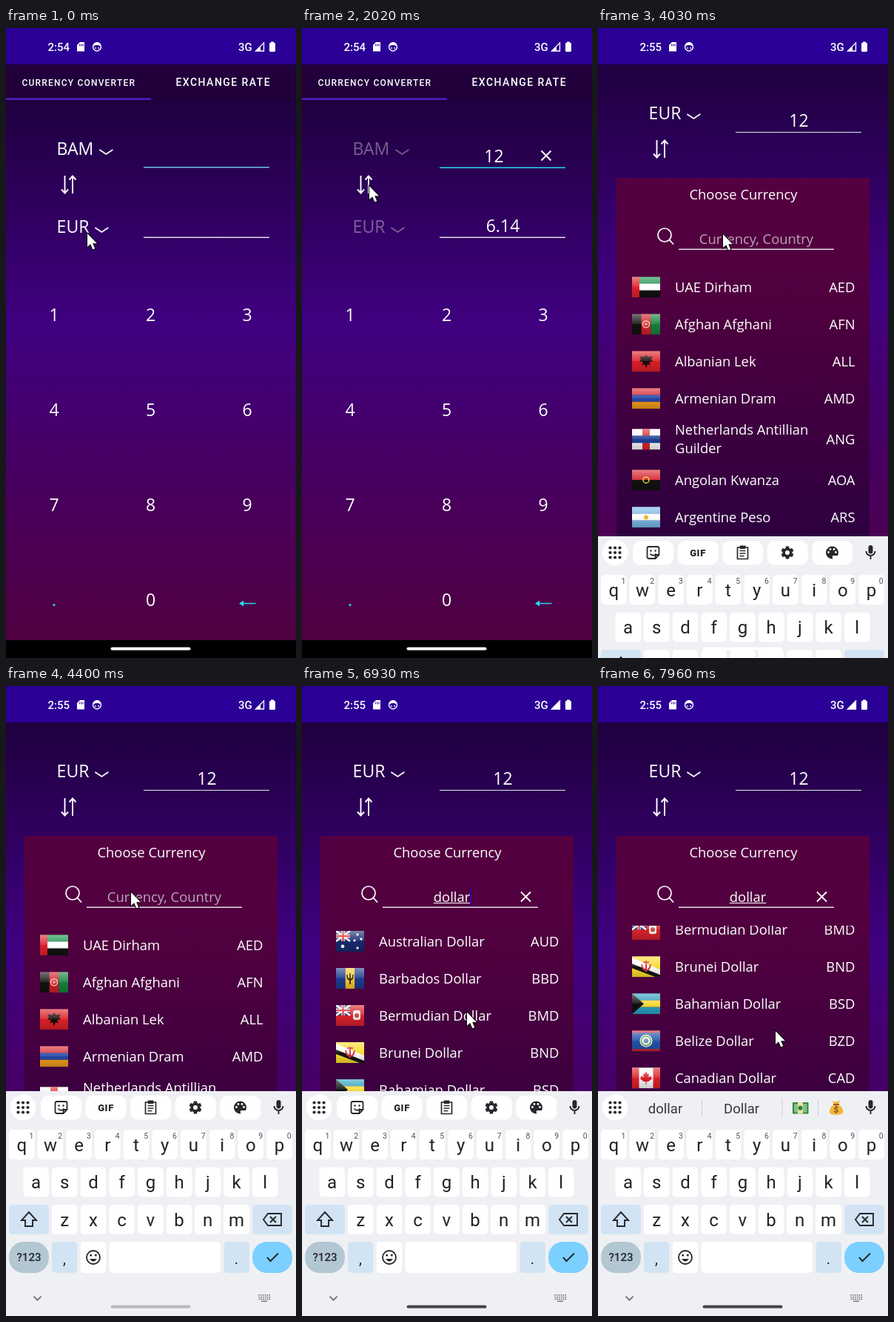
Animation of 392x849 px, one loop 7990 ms. Source, as an HTML page with a canvas:

```html
<!DOCTYPE html>
<html lang="en">
<head>
<meta charset="utf-8">
<title>Currency converter</title>
<style>
html, body { margin: 0; width: 100%; height: 100%; overflow: hidden; background: #000; }
canvas { display: block; }
</style>
</head>
<body>
<canvas id="stage" width="392" height="849"></canvas>
<script>
const c = document.getElementById('stage').getContext('2d');
const LOOP = 7990, SANS = '"Open Sans", "Noto Sans", sans-serif', UI = 'Roboto, sans-serif';
const CYAN = '#22d8ee', CARET = '#2e00a0', INK = '#26282c';

// ---------- helpers ----------
const clamp = v => Math.max(0, Math.min(1, v));
const prog = (t, a, b) => clamp((t - a) / (b - a));
const mix = (a, b, p) => a + (b - a) * p;
const smooth = p => p * p * (3 - 2 * p);
const out = (p, n) => 1 - (1 - p) ** n;

function rect(x, y, w, h, fill, r = 0) {
  c.fillStyle = fill;
  c.beginPath();
  c.roundRect(x, y, w, h, r);
  c.fill();
}
function dot(x, y, r, fill) {
  c.fillStyle = fill;
  c.beginPath();
  c.arc(x, y, r, 0, 7);
  c.fill();
}
function ring(x, y, r, color, w) {
  c.strokeStyle = color;
  c.lineWidth = w;
  c.beginPath();
  c.arc(x, y, r, 0, 7);
  c.stroke();
}
// SVG path at x, y; filled when w is 0, otherwise stroked
function path(d, x, y, color, w = 0) {
  const p = new Path2D(d);
  c.save();
  c.translate(x, y);
  c.fillStyle = c.strokeStyle = color;
  c.lineWidth = w;
  w ? c.stroke(p) : c.fill(p);
  c.restore();
}
// y is the middle of the capitals
function text(s, x, y, size, { color = '#fff', align = 'left', font = SANS, weight = 400, gap = 0 } = {}) {
  c.font = `${weight} ${size}px ${font}`;
  c.letterSpacing = gap + 'px';
  c.textAlign = align;
  c.fillStyle = color;
  c.fillText(s, x, y + size * 0.357);
  const w = c.measureText(s).width;
  c.letterSpacing = '0px';
  return w;
}
function gradient(y, h, stops) {
  const g = c.createLinearGradient(0, y, 0, y + h);
  stops.forEach(([p, color]) => g.addColorStop(p, color));
  return g;
}
const cross = (x, y) => path('M-6.5-6.5L6.5 6.5M6.5-6.5L-6.5 6.5', x, y, '#fff', 1.9);
const caret = (x, y, h) => rect(Math.floor(x), y, 2, h, CARET);

// ---------- flags, 38 x 28 ----------
const W = 38, H = 28;
const rows = (...cs) => cs.forEach((k, i) => rect(0, i * H / cs.length, W, H / cs.length, k));
const cols = (...cs) => cs.forEach((k, i) => rect(i * W / cs.length, 0, W / cs.length, H, k));
function ensign(base) {
  rect(0, 0, W, H, base);
  rect(0, 0, 19, 14, '#1d2f73');
  path('M0 0L19 14M19 0L0 14', 0, 0, '#fff', 2.4);
  path('M9.5 0V14M0 7H19', 0, 0, '#fff', 4.4);
  path('M9.5 0V14M0 7H19', 0, 0, '#d22', 2.4);
}
const FLAGS = {
  AED() { rows('#149148', '#fff', '#111'); rect(0, 0, 10, H, '#e0202a'); },
  AFN() { cols('#111', '#d01f26', '#17803c'); ring(19, 14, 4.5, '#f0c0b0', 1.6); dot(19, 14, 2, '#e8a090'); },
  ALL() { rect(0, 0, W, H, '#dc1f26'); path('M19 5l3 3 6-1-2 4 2 3-5 1 2 4-4-1-2 5-2-5-4 1 2-4-5-1 2-3-2-4 6 1z', 0, 0, '#1a0a0a'); },
  AMD() { rows('#d6232c', '#2145a5', '#ee9a1c'); },
  ANG() { rect(0, 0, W, H, '#f6f6f6'); rect(14, 0, 10, H, '#d8232a'); rect(0, 9, W, 10, '#1c3f96'); },
  AOA() { rows('#d6202a', '#111'); ring(19, 14, 4, '#f4cc2c', 1.6); },
  ARS() { rows('#78b6e6', '#fff', '#78b6e6'); dot(19, 14, 3, '#f0b430'); },
  AUD() {
    ensign('#17296e');
    [[9, 21, 2.4], [29, 5, 1.6], [25, 13, 1.6], [34, 11, 1.6], [29, 23, 1.8]].forEach(s => dot(...s, '#fff'));
  },
  AWG() { rect(0, 0, W, H, '#4a90dc'); rect(0, 17, W, 2, '#f6dc30'); rect(0, 21, W, 2, '#f6dc30'); dot(8, 8, 3, '#d8232a'); },
  AZN() { rows('#2396c8', '#d8232a', '#2a9a4c'); dot(19, 14, 3, '#fff'); },
  BAM() { rect(0, 0, W, H, '#1c3596'); path('M11 0H33V28z', 0, 0, '#f6cf2a'); },
  BBD() { cols('#1c3c8e', '#f8c92c', '#1c3c8e'); path('M19 7V22M15 9q0 7 4 7q4 0 4-7', 0, 0, '#1a1a1a', 1.7); },
  BMD() { ensign('#d6222c'); rect(23, 7, 10, 13, '#f4ece4', 3); dot(28, 14, 3, '#c8444a'); },
  BND() {
    rect(0, 0, W, H, '#f8dc2c');
    path('M0 2L38 18V26L0 10z', 0, 0, '#fff');
    path('M0 10L38 25V28H32L0 16z', 0, 0, '#151515');
    path('M19 6V21M13 11q1 8 6 8q5 0 6-8M15 8H23', 0, 0, '#d6303a', 2);
  },
  BSD() { rows('#2a9fc0', '#f8dc3c', '#2a9fc0'); path('M0 0L16 14L0 28z', 0, 0, '#111'); },
  BZD() {
    rect(0, 0, W, H, '#2254a8');
    rect(0, 0, W, 3, '#d6222c');
    rect(0, 25, W, 3, '#d6222c');
    dot(19, 14, 8.5, '#f2f2ea');
    ring(19, 14, 6.5, '#58a058', 1.4);
    rect(16, 11, 6, 6, '#6f9cc0', 2);
  },
  CAD() {
    rect(0, 0, W, H, '#f8f8f8');
    rect(0, 0, 9.5, H, '#dc2028');
    rect(28.5, 0, 9.5, H, '#dc2028');
    path('M19 5l2 4 2-1-.6 5 3-2 1.6 4-5 4H16l-5-4 1.6-4 3 2-.6-5 2 1zM18.5 18h1v5h-1z', 0, 0, '#dc2028');
  }
};
function flag(code, x, y) {
  c.save();
  c.translate(x, y);
  c.beginPath();
  c.rect(0, 0, W, H);
  c.clip();
  FLAGS[code]();
  rect(0, 0, W, H, gradient(0, H, [[0, '#ffffff70'], [.48, '#ffffff18'], [.5, '#00000000'], [1, '#00000030']]));
  c.restore();
}

const CURRENCIES = [
  ['AED', 'UAE Dirham'], ['AFN', 'Afghan Afghani'], ['ALL', 'Albanian Lek'], ['AMD', 'Armenian Dram'],
  ['ANG', 'Netherlands Antillian', 'Guilder'], ['AOA', 'Angolan Kwanza'], ['ARS', 'Argentine Peso'],
  ['AUD', 'Australian Dollar'], ['AWG', 'Aruban Florin'], ['AZN', 'Azerbaijani Manat'],
  ['BAM', 'Bosnia and', 'Herzegovina Mark'], ['BBD', 'Barbados Dollar'], ['BMD', 'Bermudian Dollar'],
  ['BND', 'Brunei Dollar'], ['BSD', 'Bahamian Dollar'], ['BZD', 'Belize Dollar'], ['CAD', 'Canadian Dollar']
];

// ---------- timeline ----------
const PRESS = { one: 600, two: 1170, open: 3406, search: 3950 };
const TYPED = [4800, 5050, 5540, 5960, 6200, 6455];
// time and place of the pointer tip
const POINTER = [
  [290, 110, 277], [560, 60, 388], [680, 60, 388], [1060, 168, 386], [1400, 168, 386], [1720, 91, 213],
  [2570, 91, 213], [2900, 122, 169], [3560, 122, 169], [3900, 169, 278], [5950, 169, 278], [6700, 222, 478],
  [6750, 222, 478], [6930, 223, 440], [7150, 229, 385], [7250, 230, 383], [7800, 240, 465]
];
function pointerAt(t) {
  const i = POINTER.findIndex(k => k[0] > t);
  if (i < 0) return POINTER.at(-1).slice(1);
  if (!i) return POINTER[0].slice(1);
  const [a, b] = [POINTER[i - 1], POINTER[i]], p = prog(t, a[0], b[0]);
  const e = t > 6750 && t < 7150 ? p : smooth(p);
  return [mix(a[1], b[1], e), mix(a[2], b[2], e)];
}
function scrollAt(t) {
  if (t < 6930) return 5 * prog(t, 6890, 6930);
  return t < 7150 ? mix(5, 60, prog(t, 6930, 7150)) : mix(60, 121, out(prog(t, 7150, 7990), 3));
}

// ---------- screen parts ----------
function statusBar(t) {
  rect(0, 0, 392, 49, '#2b0096');
  const opt = { font: UI, weight: 500 };
  text(t < 2700 ? '2:54' : '2:55', 56.5, 25.5, 15, opt);
  path('M100 19H106V31.5H96V23z', 0, 0, '#fff');
  path('M99.7 21.5v3M102 21.5v3M104.2 21.5v3', 0, 0, '#2b0096', 1);
  ring(123, 25.5, 5.4, '#fff', 1.5);
  path('M117.5 24.5a5.5 5.5 0 0 1 11 0q-5.5-3-11 0z', 0, 0, '#fff');
  dot(121, 27, .9, '#fff');
  dot(125, 27, .9, '#fff');
  text('3G', 314, 25.5, 15, opt);
  path('M348.5 20V31H337.5z', 0, 0, '#fff', 1.3);
  path(t < 4600 ? 'M344 25V31H337.5z' : 'M349 19V31.5H336.5z', 0, 0, '#fff');
  rect(358, 18.5, 4, 3, '#fff');
  rect(356, 20, 8, 12, '#fff', 1.2);
}

function tabs() {
  rect(0, 49, 392, 48, '#21003b');
  const opt = { font: UI, weight: 500 };
  text('CURRENCY CONVERTER', 21.5, 73.5, 12, { ...opt, gap: 1.2 });
  text('EXCHANGE RATE', 229.5, 73.5, 14, { ...opt, gap: 1.45 });
  rect(0, 94.5, 196, 2.5, '#4c1fc2');
}

function currency(name, y) {
  const w = text(name, 68.6, y, 23);
  path('M-9-3L0 3L9-3', 68.6 + w + 17, y + 4, '#fff', 1.8);
}

function ripple(t, start, x, y, cx, cy) {
  const p = prog(t, start, start + 250);
  if (t < start || t > start + 400) return;
  const px = mix(x, cx, p), py = mix(y, cy, p), r = mix(42, 56, p);
  c.globalAlpha = prog(t, start, start + 60) * (1 - prog(t, start + 200, start + 400));
  const g = c.createRadialGradient(px, py, 0, px, py, r);
  [[0, '#ffffff44'], [.5, '#ffffff3a'], [.8, '#ffffff22'], [1, '#ffffff00']].forEach(s => g.addColorStop(...s));
  dot(px, py, r, g);
  c.globalAlpha = 1;
}

function converter(t) {
  const swapped = t >= 2100, focus = t < PRESS.search;
  const amount = t < 620 ? '' : t < 1190 ? '1' : '12';
  const result = swapped ? '23.47' : ['', '0.51', '6.14'][amount.length];
  c.globalAlpha = swapped ? prog(t, 2110, 2310) : 1 - prog(t, 1940, 2070);
  currency(swapped ? 'EUR' : 'BAM', 163);
  currency(swapped ? 'BAM' : 'EUR', 268);
  c.globalAlpha = 1;
  path('M79.5 199V222M75 217.5L79.5 222.5L84 217.5M90 223V200M85.5 204.5L90 199.5L94.5 204.5', 0, 0, '#fff', 1.9);

  const x = amount && focus ? 259.5 : 271.5;
  const w = text(amount, x, 172.5, 23, { align: 'center' });
  if (focus && (t >= 110 && t < 1690 || t >= 2620)) caret(x + w / 2, 157, 29);
  if (focus && amount) cross(330, 172);
  if (focus) rect(186, amount ? 187.5 : 187, 170, 1.5, amount ? CYAN : '#6cc4ea');
  else rect(186, 188, 170, 1, '#e8e2ee');
  text(result, 271.5, 266.5, 23, { align: 'center' });
  rect(186, 281.5, 170, 1.5, '#e0dce6');
}

function keypad() {
  for (let i = 0; i < 9; i++) text(i + 1, 65 + i % 3 * 130.6, 387 + (i / 3 | 0) * 128, 23, { align: 'center' });
  text('0', 195.6, 771, 23, { align: 'center' });
  dot(65, 777.5, 1.6, CYAN);
  path('M318 775.5H337.5', 0, 0, CYAN, 1.5);
  path('M315 775.5L321 771.5V779.5z', 0, 0, CYAN);
}

function dialog(t) {
  if (t < PRESS.open) return;
  const top = mix(825, 202, out(prog(t, PRESS.open, 3618), 2)), h = 623;
  const flags = t >= 3650;
  const query = 'dollar'.slice(0, TYPED.filter(k => k <= t).length);
  rect(25, top, 342, h, gradient(top, h, [[0, '#550040'], [.25, '#50003f'], [1, '#1f0040']]));
  text('Choose Currency', 196.5, top + 22.5, 18.4, { align: 'center' });
  ring(90, top + 77, 9, '#fff', 1.7);
  path('M96.5 83.5L102 89.5', 0, top, '#fff', 1.8);
  rect(109, top + 95.5, 210, 1.4, '#e4dce4');

  if (query) {
    const w = text(query, 202.5, top + 82.5, 18.4, { align: 'center' });
    rect(202.5 - w / 2, top + 90, w, 1.1, '#fff');
    const last = TYPED[query.length - 1];
    if (Math.floor((t - last) / 500) % 2 == 0) caret(202.5 + w / 2, top + 69, 25);
    cross(302.5, top + 82);
  } else {
    text('Currency, Country', 214, top + 82, 18.4, { align: 'center', color: '#bba6b8' });
  }

  c.save();
  c.beginPath();
  c.rect(25, top + 121, 342, h - 121);
  c.clip();
  let y = top + 122.2 - scrollAt(t);
  for (const [code, ...lines] of CURRENCIES) {
    if (!lines.join(' ').toLowerCase().includes(query)) continue;
    const rowH = Math.max(flags ? 50 : 35.2, lines.length > 1 ? 60 : 0), mid = y + rowH / 2;
    lines.forEach((s, i) => text(s, 104, mid + (i - (lines.length - 1) / 2) * 25, 18.4));
    text(code, 347.5, mid, 18.4, { align: 'right' });
    if (flags) flag(code, 46, mid - 14);
    y += rowH;
  }
  c.restore();
}

function toolbar() {
  for (let i = 0; i < 5; i++) rect(47 + i * 60.6, 552, 55, 32.5, '#fff', 10);
  path('M-8-5.5q0-2.5 2.5-2.5H5.5q2.5 0 2.5 2.5V3L3 8H-5.5q-2.5 0-2.5-2.5zM8 3H5q-2 0-2 2V8M-4 1.5q4 4.5 8 0', 74.5, 568, INK, 1.8);
  dot(71.5, 565.5, 1.2, INK);
  dot(77.5, 565.5, 1.2, INK);
  text('GIF', 135, 568, 13, { font: UI, weight: 900, align: 'center', color: INK, gap: .6 });
  path('M-7-7H7V8.5H-7zM-4-2.5H4M-4 1H4M-4 4.5H2', 195.5, 568, INK, 1.7);
  rect(191.5, 558.5, 8, 4.5, INK, 1);
  for (let i = 0; i < 6; i++) {
    const a = (i + .5) * Math.PI / 3, x = Math.cos(a), y = Math.sin(a);
    path(`M${x * 5} ${y * 5}L${x * 8.5} ${y * 8.5}`, 256, 568, INK, 4.5);
  }
  ring(256, 568, 4.8, INK, 3.6);
  dot(316.5, 568, 8.5, INK);
  [[-5, -.5], [-2.5, -4.5], [2.5, -4.5], [5, -.5]].forEach(([x, y]) => dot(316.5 + x, 568 + y, 1.4, '#fff'));
  path('M1 9q-2-5 1-5H9V9z', 316.5, 568, '#fff');
}

function suggestions() {
  const opt = { font: UI, align: 'center', color: '#34363a' };
  text('dollar', 91, 569, 18.5, opt);
  text('Dollar', 194, 569, 18.5, opt);
  [140, 248.5, 297].forEach(x => rect(x, 556, 1, 25, '#cfd0d4'));
  rect(263, 561, 21.5, 15.5, '#2f8a45', 1);
  rect(265, 563, 17.5, 11.5, '#7fc487', 1);
  rect(270, 561, 7, 15.5, '#f0dfa0');
  dot(273.5, 568.7, 3, '#2f7a45');
  path('M-3-4L-5-9Q0-6 5-10L3-4Q11 2 9 7Q7 10 0 10Q-8 10-9 7Q-10 1-3-4z', 322, 568, '#f2b63a');
  path('M-4-4H4', 322, 568, '#a05a20', 2);
  text('$', 322, 571, 11, { ...opt, weight: 700, color: '#7a4a18' });
}

function keyboard(t) {
  if (t < PRESS.search) return;
  c.save();
  c.translate(0, 303 * (1 - out(prog(t, PRESS.search + 10, 4180), 2)));
  rect(0, 546, 392, 303, '#eff0f4');
  dot(23, 568, 17.5, '#fff');
  for (let i = 0; i < 9; i++) dot(16.5 + i % 3 * 6.5, 561.5 + (i / 3 | 0) * 6.5, 2.1, INK);
  t < 7200 ? toolbar() : suggestions();
  path('M0 2.5a3 3 0 0 0 3-3V-6a3 3 0 0 0-6 0V-.5a3 3 0 0 0 3 3z', 368.5, 567, INK);
  path('M-6-1a6 6 0 0 0 12 0M0 5V10', 368.5, 567, INK, 1.9);

  const BLUE = '#d2e4f4', opt = { font: UI, align: 'center', color: '#202226' };
  [['qwertyuiop', 4, 598], ['asdfghjkl', 23.4, 648.5], ['zxcvbnm', 62, 699]].forEach(([keys, x0, y], row) =>
    [...keys].forEach((k, i) => {
      const x = x0 + i * 38.7;
      rect(x, y, 34.5, 40, '#fff', 5);
      text(k, x + 17.2, y + 20, 24, opt);
      if (!row) text((i + 1) % 10, x + 30.5, y + 8, 10.5, { ...opt, color: '#505258' });
    }));
  rect(4, 699, 54, 40, BLUE, 5);
  path('M0-10L10 1H5V9H-5V1H-10z', 31, 719, INK, 1.9);
  rect(333, 699, 54, 40, BLUE, 5);
  path('M-12 0L-6-8H12V8H-6zM-3-4L5 4M5-4L-3 4', 360, 719, INK, 1.9);
  rect(4, 749, 54, 42, '#b3c7d3', 20);
  text('?123', 31, 770, 15, { ...opt, weight: 500 });
  rect(62, 749, 34.5, 42, BLUE, 5);
  text(',', 79, 772, 20, opt);
  rect(100.7, 749, 34.5, 42, '#fff', 5);
  ring(118, 770, 9, INK, 1.8);
  dot(114.7, 767, 1.5, INK);
  dot(121.3, 767, 1.5, INK);
  path('M-5 2q5 7 10 0z', 118, 770, INK);
  rect(139.4, 749, 150.6, 42, '#fff', 5);
  rect(294.5, 749, 34.5, 42, BLUE, 5);
  text('.', 311.5, 772, 20, opt);
  rect(333, 749, 54, 42, '#7bd0ff', 20);
  path('M-7 0L-2.5 5L8-5.5', 360, 770, INK, 2);
  path('M-5-2.5L0 2.5L5-2.5', 42.5, 825, '#606268', 1.6);
  for (let i = 0; i < 18; i++) rect(341.5 + i % 6 * 2.8, 820 + (i / 6 | 0) * 2.8, 1.6, 1.6, '#70727a');
  rect(345, 828.5, 8, 1.4, '#70727a');
  c.restore();
}

function navPill(t) {
  const v = Math.round(mix(186, 70, prog(t, 5010, 5130)));
  rect(141.5, 834.5, 108, 4, t < 4050 ? '#fff' : `rgb(${v},${v},${v})`, 2);
}

function pointer(t) {
  const [x, y] = pointerAt(t);
  const d = 'M0 0V18L4.2 14.3L7.3 21.5L10.3 20.2L7.2 13.2H13z';
  path(d, x, y, '#000', 1.8);
  path(d, x, y, '#fff');
}

function draw(now) {
  const t = now % LOOP, shift = t < PRESS.open ? 0 : -48;
  rect(0, 0, 392, 849, '#000');
  const y0 = 97 + shift;
  rect(0, 49, 392, 776, gradient(y0, 825 - y0, [[0, '#1f003f'], [shift ? .39 : .416, '#400080'], [1, '#500040']]));
  if (!shift) tabs();
  statusBar(t);
  c.save();
  c.translate(0, shift);
  converter(t);
  keypad();
  c.restore();
  ripple(t, PRESS.one, 60, 388, 65, 387);
  ripple(t, PRESS.two, 168, 386, 196, 387);
  rect(0, 825, 392, 24, '#000');
  dialog(t);
  keyboard(t);
  navPill(t);
  pointer(t);
  requestAnimationFrame(draw);
}
requestAnimationFrame(draw);
</script>
</body>
</html>
```
